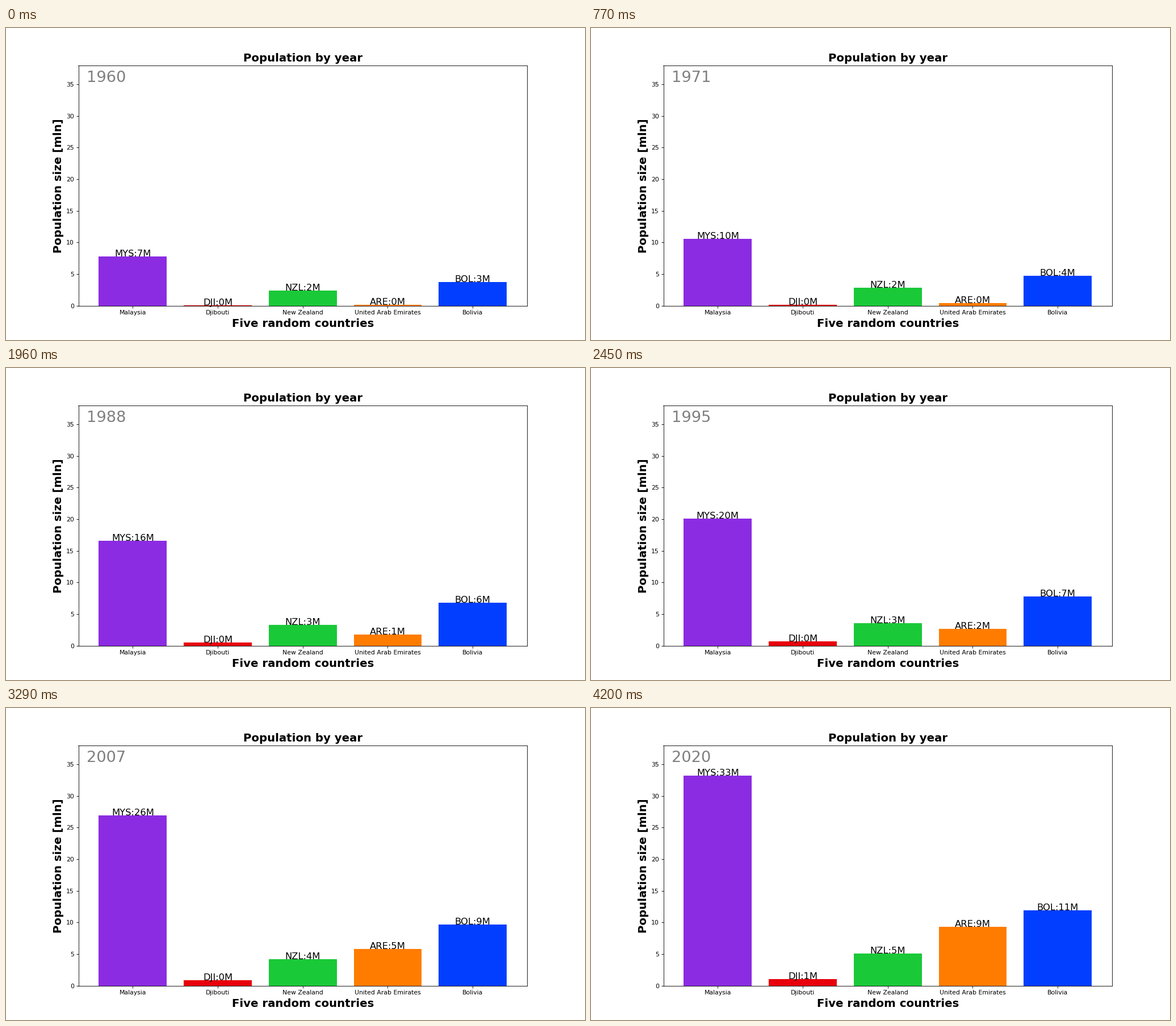
These frames come from a looping animation (1020x549 px, 4.27 s). A matplotlib script:

```python
import numpy as np
import matplotlib.pyplot as plt
from matplotlib.animation import FuncAnimation

WIDTH, HEIGHT, DPI = 1020, 549, 64
K = WIDTH / 13 / DPI  # scales point sizes as if the figure were 13 inches wide

START, COUNT = 1960, 61
T = np.arange(COUNT)


def ease(lo, hi):
    """Smooth step from 0 to 1 between two years since the start."""
    u = np.clip((T - lo) / (hi - lo), 0, 1)
    return u * u * (3 - 2 * u)


def growth(start, slope, gain, lo, hi):
    """Growth whose average yearly gain rises smoothly from lo to hi."""
    return start + T * (slope + gain * ease(lo, hi))


malaysia = growth(7.8, 0.247, 0.177, 8, 56)
djibouti = growth(0.084, 0.006, 0.0107, 8, 32)
new_zealand = np.interp(T, [0, 14, 30, 43, 53, 60],
                        [2.372, 3.02, 3.33, 4.02, 4.44, 5.09])
# a power curve, then a short surge, then a slow rise
emirates = (0.13 + 0.0033 * np.minimum(T, 44) ** 1.865
            + 4.6 * ease(44, 51) + 0.08 * np.maximum(T - 51, 0))
bolivia = 3.71 + 0.0865 * T + 0.00084 * T ** 2

COUNTRIES = [
    ("Malaysia", "MYS", "#8b2be2", malaysia),
    ("Djibouti", "DJI", "#e8000b", djibouti),
    ("New Zealand", "NZL", "#1ac938", new_zealand),
    ("United Arab Emirates", "ARE", "#ff7c00", emirates),
    ("Bolivia", "BOL", "#023eff", bolivia),
]

plt.rcParams["font.family"] = "DejaVu Sans"
plt.rcParams["axes.linewidth"] = 0.8 * K

fig, ax = plt.subplots(figsize=(WIDTH / DPI, HEIGHT / DPI), dpi=DPI)
fig.subplots_adjust(left=0.125, right=0.9, bottom=0.11, top=0.88)

names, codes, colors, data = zip(*COUNTRIES)
bars = ax.bar(names, [0] * len(names), color=colors, width=0.8)
labels = [ax.text(i, 0, "", ha="center", fontsize=15 * K)
          for i in range(len(names))]
year_text = ax.text(0.062, 0.947, "", transform=ax.transAxes, color="#808080",
                    fontsize=25 * K, ha="center", va="center")

ax.set_xlim(-0.64, 4.64)
ax.set_ylim(0, 38)
ax.set_yticks(range(0, 36, 5))
ax.tick_params(labelsize=10 * K, length=3.5 * K, width=0.8 * K, pad=3.5 * K)

bold = dict(fontsize=18.1 * K, fontweight="bold")
ax.set_title("Population by year", pad=6 * K, **bold)
ax.set_xlabel("Five random countries", labelpad=4 * K, **bold)
ax.set_ylabel("Population size [mln]", labelpad=4 * K, **bold)


def update(i):
    for bar, label, code, values in zip(bars, labels, codes, data):
        size = values[i]
        bar.set_height(size)
        label.set_y(size)
        label.set_text(f"{code}:{int(size)}M")
    year_text.set_text(str(START + i))
    return [*bars, *labels, year_text]


anim = FuncAnimation(fig, update, frames=COUNT, interval=70,
                     repeat=True, repeat_delay=0)
plt.show()
```
